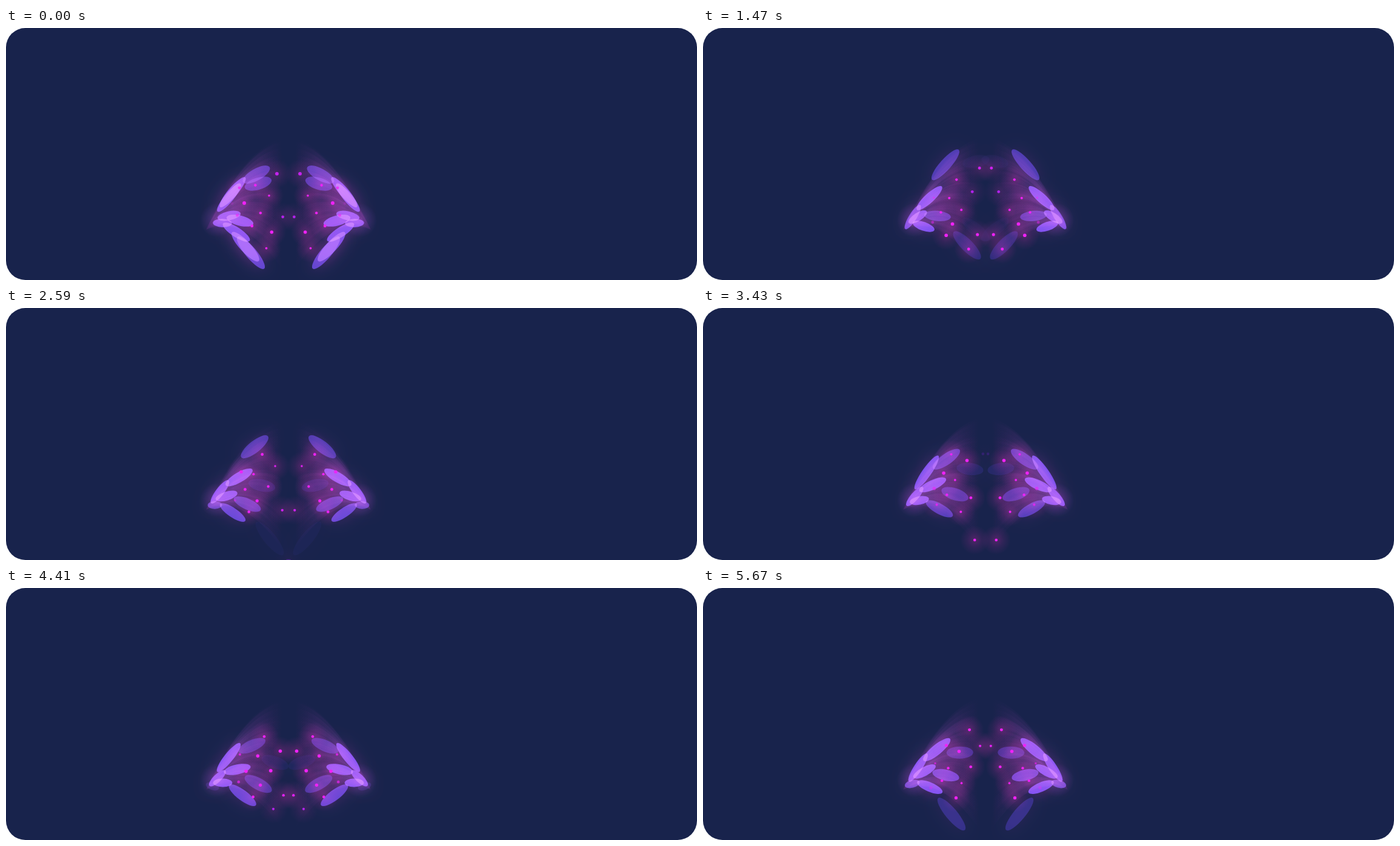
These frames come from a looping animation (1140 by 416 pixels, 5740 ms). An HTML page with a canvas:

```html
<!DOCTYPE html>
<html lang="en">
<head>
<meta charset="utf-8">
<title>Glowing wings</title>
<style>
  html, body { margin: 0; width: 100%; height: 100%; overflow: hidden; background: #fff; }
  canvas { display: block; width: 1140px; height: 416px; }
</style>
</head>
<body>
<canvas id="stage" width="1140" height="416"></canvas>
<script>
const ctx = document.getElementById('stage').getContext('2d');
const W = 1140, H = 416;
const LOOP = 5740, STEP = 70, HOLD = 210;
const AXIS = 466;                // mirror line
const OX = 338, OY = 327;        // emitter
const BEND = 0.0075;             // downward curve of every path
const LEAF = { life: 1900, reach: 110, ease: 1.25, every: 190 };
const DOT = { life: 2300, reach: 130, ease: 1, every: 135 };

const clamp = (v, lo = 0, hi = 1) => Math.min(hi, Math.max(lo, v));
const mix = (a, b, k) => a + (b - a) * k;
const golden = i => (i * 0.618034) % 1;

let seed = 11;
const rnd = () => {
  seed = (seed * 16807) % 2147483647;
  return seed / 2147483647;
};

// All particles leave the emitter and follow a falling parabola.
const pathY = (slope, dx) => slope * dx + BEND * dx * dx;

function travel(kind, p, u) {
  const age = (u - p.born) / kind.life;
  const dx = age > 0 ? kind.reach * age ** kind.ease : -1;
  return { dx, x: OX + dx, y: OY + pathY(p.slope, dx) };
}

function leafThrough(x, y) {
  const dx = x - OX;
  const age = (dx / LEAF.reach) ** (1 / LEAF.ease);
  return { born: HOLD - age * LEAF.life, slope: (y - OY) / dx - BEND * dx, end: 115 };
}

// The wings open with these leaves; the emitter continues from there.
const opening = [
  [413, 242], [416, 257], [368, 280], [374, 271], [368, 310],
  [386, 318], [357, 322], [380, 337], [395, 361], [404, 371]
];
const leaves = opening.map(([x, y]) => leafThrough(x, y));
for (let i = 0, t = HOLD + 60; t < LOOP; i++, t += LEAF.every) {
  leaves.push({ born: t + 60 * rnd(), slope: mix(-2.1, 0.15, golden(i)), end: mix(85, 118, rnd()) });
}

const dots = [];
for (let i = 0, t = HOLD - DOT.life; t < LOOP; i++, t += DOT.every) {
  dots.push({
    born: t + 120 * rnd(),
    slope: mix(-1.75, -0.2, golden(i + 3)),
    end: mix(88, 134, Math.sqrt(rnd())),
    r: mix(1.7, 3, rnd())
  });
}

const wedges = Array.from({ length: 44 }, (_, i) => ({
  slope: mix(-2, -0.55, (i + rnd()) / 44),
  half: mix(0.08, 0.2, rnd()),
  phase: rnd() * 6.3,
  rate: 1 + Math.floor(rnd() * 4)
}));

function glow(x, y, r, color, alpha) {
  const g = ctx.createRadialGradient(x, y, 0, x, y, r);
  g.addColorStop(0, `rgba(${color},${alpha})`);
  g.addColorStop(0.5, `rgba(${color},${alpha * 0.4})`);
  g.addColorStop(1, `rgba(${color},0)`);
  ctx.fillStyle = g;
  ctx.fillRect(x - r, y - r, 2 * r, 2 * r);
}

function drawHaze(u) {
  const x0 = OX - 8, y0 = OY + 6, end = 126;
  const g = ctx.createLinearGradient(x0, 0, x0 + end, 0);
  g.addColorStop(0, 'rgba(180,30,170,.03)');
  g.addColorStop(0.35, 'rgba(170,55,210,.065)');
  g.addColorStop(0.7, 'rgba(150,30,140,.05)');
  g.addColorStop(1, 'rgba(110,5,80,0)');
  ctx.fillStyle = g;
  for (const w of wedges) {
    const a = w.slope - w.half, b = w.slope + w.half;
    ctx.globalAlpha = 0.6 + 0.4 * Math.sin(w.phase + w.rate * u / LOOP * 2 * Math.PI);
    ctx.beginPath();
    ctx.moveTo(x0, y0);
    ctx.quadraticCurveTo(x0 + end / 2, y0 + a * end / 2, x0 + end, y0 + pathY(a, end));
    ctx.lineTo(x0 + end, y0 + pathY(b, end));
    ctx.quadraticCurveTo(x0 + end / 2, y0 + b * end / 2, x0, y0);
    ctx.fill();
  }
  ctx.globalAlpha = 1;
  glow(348, 317, 28, '150,45,190', 0.4);
}

function drawLeaf(p, u) {
  const { dx, x, y } = travel(LEAF, p, u);
  const a = clamp((p.end - dx) / 62);
  if (dx < 2 || a < 0.01) return;
  const tilt = (y - OY) / dx + 0.2 + 0.005 * dx;
  const halfX = Math.min(22, 10 + dx * 0.3);
  ctx.globalAlpha = a * clamp((dx - 1) / 8);
  ctx.shadowColor = 'rgba(200,30,170,.3)';
  ctx.shadowBlur = 24;
  ctx.fillStyle = `rgb(${60 + 42 * a},${35 + 18 * a},235)`;
  ctx.beginPath();
  ctx.ellipse(x, y, halfX * Math.hypot(1, tilt), Math.min(10, 6 + dx * 0.05), Math.atan(tilt), 0, 7);
  ctx.fill();
  ctx.shadowBlur = 0;
  ctx.shadowColor = 'transparent';
}

function drawDot(p, u) {
  const { dx, x, y } = travel(DOT, p, u);
  const fresh = clamp((p.end - dx) / 14);
  const alpha = clamp((dx - 32) / 20) * clamp(fresh * 2);
  if (alpha < 0.01) return;
  ctx.globalAlpha = alpha;
  glow(x, y, 24, '170,10,110', 0.36 * fresh);
  ctx.globalCompositeOperation = 'source-over';
  ctx.fillStyle = `rgb(${mix(110, 240, fresh)},34,${mix(225, 248, fresh)})`;
  ctx.beginPath();
  ctx.arc(x, y, p.r, 0, 7);
  ctx.fill();
  ctx.globalCompositeOperation = 'screen';
}

function render(u) {
  ctx.setTransform(1, 0, 0, 1, 0, 0);
  ctx.clearRect(0, 0, W, H);
  ctx.save();
  ctx.beginPath();
  ctx.roundRect(0, 0, W, H, 32);
  ctx.clip();
  ctx.fillStyle = '#18234c';
  ctx.fillRect(0, 0, W, H);
  ctx.globalCompositeOperation = 'screen';
  for (const side of [1, -1]) {
    ctx.setTransform(side, 0, 0, 1, side < 0 ? 2 * AXIS : 0, 0);
    drawHaze(u);
    leaves.forEach(p => drawLeaf(p, u));
    dots.forEach(p => drawDot(p, u));
    ctx.globalAlpha = 1;
  }
  ctx.restore();
}

let last = -1;
const start = performance.now();
function tick(now) {
  const t = Math.max(0, now - start) % LOOP;
  const u = Math.max(HOLD, Math.floor(t / STEP) * STEP);
  if (u !== last) render(last = u);
  requestAnimationFrame(tick);
}
tick(start);
</script>
</body>
</html>
```
